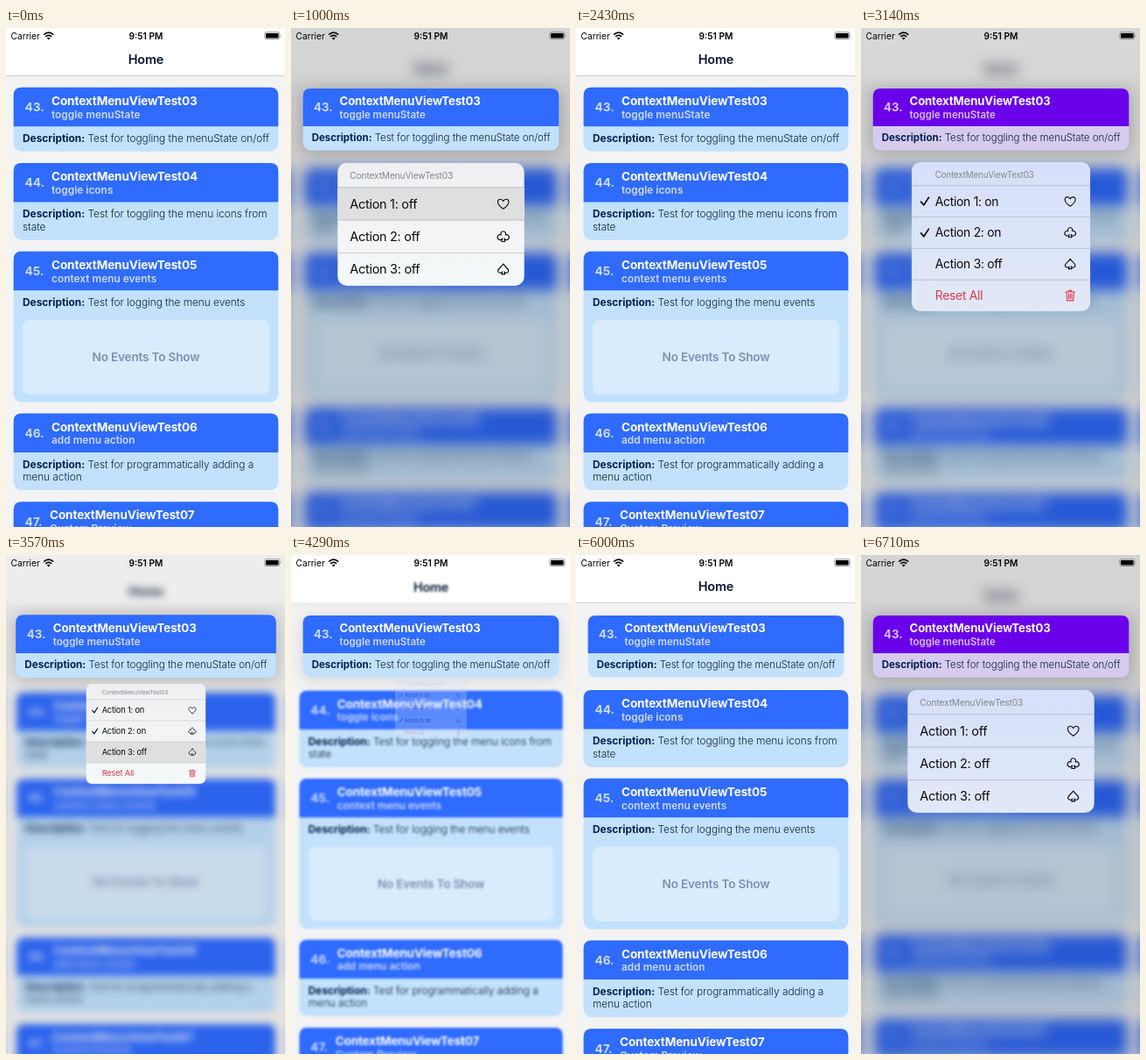
These frames come from a looping animation (319x569 px, 7 s). An HTML page:

```html
<!DOCTYPE html>
<html lang="en">
<head>
<meta charset="utf-8">
<style>
html, body { margin: 0; height: 100%; overflow: hidden; background: #f3f3f3; }
svg { display: block; width: 100%; height: 100%; font-family: Inter, "Liberation Sans", sans-serif; }
.title { font-size: 13.6px; font-weight: 700; letter-spacing: -.14px; fill: #fff; }
.num { font-size: 13.6px; font-weight: 700; fill: #ffffffbf; }
.sub { font-size: 11.9px; font-weight: 600; fill: #ffffffbf; }
.desc { font-size: 11.9px; font-weight: 300; letter-spacing: -.05px; fill: #10233f; }
.label { font-weight: 700; letter-spacing: 0; fill: #06204f; }
.empty { font-size: 13.6px; font-weight: 600; letter-spacing: -.2px; fill: #06204f70; text-anchor: middle; }
.nav { font-size: 14.5px; font-weight: 600; letter-spacing: -.2px; fill: #0b1733; text-anchor: middle; }
.status { font-size: 10.2px; }
.head { fill: var(--head, #2f6bff); }
.body { fill: var(--body, #c2e1fc); }
.caption { font-size: 10.2px; letter-spacing: -.15px; fill: #85868d; }
.action { font-size: 14.5px; letter-spacing: -.3px; }
.icon { fill: none; stroke-width: 1.2; stroke-linejoin: round; stroke-linecap: round; }
#bg { transform-origin: 159.5px 284.5px; }
#card { transform-origin: 160px 104.5px; }
#menu { transform-origin: 160px 135px; }
</style>
</head>
<body>
<svg viewBox="0 0 319 569">
  <defs>
    <linearGradient id="tint" x2="0" y2="1">
      <stop stop-color="#d7dffa"/><stop offset="1" stop-color="#e1e9f8"/>
    </linearGradient>
    <linearGradient id="plain" x2="0" y2="1">
      <stop stop-color="#efeff1"/><stop offset="1" stop-color="#f5f8f9"/>
    </linearGradient>
    <clipPath id="menuClip"><rect id="clipBox" x="53.3" y="153.7" width="213.4" rx="10.5"/></clipPath>
  </defs>
  <g id="bg">
    <rect x="-60" y="-60" width="439" height="689" fill="#f3f3f3"/>
    <path d="M-60-60H379V54H-60z" fill="#fff"/>
    <path d="M-60 54.5H379" stroke="#d2d2d4"/>
    <text class="nav" x="160" y="41">Home</text>
    <g id="list"></g>
    <!-- The blur mirrors the list at the screen edges. -->
    <use href="#list" transform="scale(-1 1)"/>
    <use href="#list" transform="translate(638) scale(-1 1)"/>
  </g>
  <rect id="dim" width="319" height="569"/>
  <g id="card"></g>
  <g id="menu"></g>
  <g class="status">
    <text x="5.5" y="12.6">Carrier</text>
    <g fill="none" stroke="#000" stroke-width="1.7">
      <path d="M43.2 7.6Q48.7 2.8 54.2 7.6M45.2 9.9Q48.7 7 52.2 9.9"/>
    </g>
    <path d="M46.8 11.4Q48.7 10 50.6 11.4L48.7 13.4z"/>
    <text x="160" y="12.6" text-anchor="middle" font-weight="600">9:51 PM</text>
    <rect x="295.8" y="4.8" width="17" height="7.8" rx="2" fill="none" stroke="#777" stroke-width=".8"/>
    <rect x="297" y="6" width="14.6" height="5.4" rx="1"/>
    <path d="M313.8 7.3Q315.2 8.7 313.8 10.1z" fill="#777"/>
  </g>
</svg>
<script>
const $ = id => document.getElementById(id);
const clamp = v => Math.max(0, Math.min(1, v));
const easeInOut = v => (v = clamp(v)) < .5 ? 4 * v ** 3 : 1 - (2 - 2 * v) ** 3 / 2;
const easeOut = v => 1 - (1 - clamp(v)) ** 3;
const text = (cls, x, y, s, extra = '') => `<text class="${cls}" x="${x}" y="${y}" ${extra}>${s}</text>`;

function card(num, y, height, sub, line1, line2 = '', titleX = 52) {
  return `<rect class="body" x="8.7" y="${y}" width="302.6" height="${height}" rx="9"/>
    <path class="head" d="M8.7 ${y + 44.5}v-35.5q0-9 9-9h284.6q9 0 9 9v35.5z"/>` +
    text('num', 21.5, y + 27.2, num + '.') +
    text('title', titleX, y + 20, 'ContextMenuViewTest0' + (num - 40)) +
    text('sub', titleX, y + 34.8, sub) +
    text('desc', 19, y + 62, `<tspan class="label">Description:</tspan> ${line1}`) +
    text('desc', 19, y + 76.6, line2);
}

$('list').innerHTML =
  card(44, 154, 88, 'toggle icons', 'Test for toggling the menu icons from', 'state') +
  card(45, 254.7, 172, 'context menu events', 'Test for logging the menu events') +
  '<rect x="19" y="332.7" width="282" height="85" rx="8" fill="#fff" fill-opacity=".36"/>' +
  text('empty', 160, 380, 'No Events To Show') +
  card(46, 439.5, 87.5, 'add menu action', 'Test for programmatically adding a', 'menu action') +
  card(47, 540.3, 88, 'Custom Preview', '', '', 50);
$('card').innerHTML = card(43, 67.7, 73, 'toggle menuState', 'Test for toggling the menuState on/off');

const ICONS = [
  'M0 6.2C-9 .5-7.5-5.5-3.7-5.5-1.8-5.5-.6-4.4 0-3 .6-4.4 1.8-5.5 3.7-5.5 7.5-5.5 9 .5 0 6.2Z',
  'M-1.2 2.4A3.1 3.1 0 1 1-2.6-2 3 3 0 1 1 2.6-2 3.1 3.1 0 1 1 1.2 2.4L2 6H-2Z',
  'M0-6.5C2-3 6.5-1 6.5 1.8A2.9 2.9 0 0 1 1.2 3L2 6H-2L-1.2 3A2.9 2.9 0 0 1-6.5 1.8C-6.5-1-2-3 0-6.5Z',
  'M-6-4.5H6M-2-4.5V-6.3H2V-4.5M-4.7-4.5L-4 6.5H4L4.7-4.5M-2-2V4M0-2V4M2-2V4'
];
const TOP = 153.7, HEADER = 28, ROW = 37.4;

// `on` counts the enabled actions, `pick` is the pressed row or -1.
function menu(on, pick, tapped) {
  const rows = on ? 4 : 3, height = HEADER + rows * ROW, x = on ? 81.5 : 67.3;
  $('clipBox').setAttribute('height', height);
  let out = `<g clip-path="url(#menuClip)">
    <rect x="53" y="${TOP}" width="214" height="${height}" fill="url(#${tapped ? 'plain' : 'tint'})"/>` +
    text('caption', x, 172.3, 'ContextMenuViewTest03');
  for (let i = 0; i < rows; i++) {
    const y = TOP + HEADER + i * ROW, mid = y + ROW / 2, reset = i === 3;
    const color = reset ? '#e23b48' : '#0c0c10';
    if (i === pick) out += `<rect x="53" y="${y}" width="214" height="${ROW}" fill="#dfdfdf"/>`;
    out += `<path d="M53 ${y}h214" stroke="#3c3c43" stroke-opacity=".28" stroke-width=".8"/>` +
      text('action', x, mid + 5.2, reset ? 'Reset All' : `Action ${i + 1}: ${i < on ? 'on' : 'off'}`, `fill="${color}"`) +
      `<path class="icon" stroke="${color}" transform="translate(242.7 ${mid}) scale(.94)" d="${ICONS[i]}"/>`;
    if (i < on) out += `<path class="icon" style="stroke-width:1.8" stroke="#0c0c10" d="M64.5 ${mid + .5}l3.3 4 6-9"/>`;
  }
  return out + '</g>';
}

// Each visit: finger down, menu opens, menu closes.
const VISITS = [
  { press: 20, open: 430, close: 1080, on: 0, pick: 0 },
  { press: 1400, open: 1640, close: 2080, on: 1, pick: 1 },
  { press: 2442, open: 2842, close: 3400, on: 2, pick: 2 },
  { press: 3762, open: 4162, close: 5070, on: 3, pick: 3 },
  { press: 5600, open: 6010, close: 9000, on: 0, pick: 0 }
];
const LOOP = 7000, STEP = LOOP / 49;

function render(t) {
  const v = VISITS.findLast(visit => visit.press <= t) || VISITS[0];
  const tapped = t >= v.close - 130;
  const stay = 1 - easeInOut((t - v.close) / 340);
  const shown = easeInOut((t - v.open) / 400) * stay;
  const pressed = easeOut((t - v.press) / 240) * stay;
  const purple = tapped ? 0 : 100 * clamp((t - v.open - 130) / 150);
  const mix = (a, b) => `color-mix(in srgb, ${a} ${purple}%, ${b})`;

  $('bg').style.transform = `scale(${1 - .045 * shown})`;
  $('bg').style.filter = shown ? `blur(${Math.min(1, shown * 1.1) * 8}px)` : 'none';
  $('dim').style.opacity = .17 * Math.max(0, shown * 1.15 - .15);

  const c = $('card').style;
  c.transform = `scale(${1 - .033 * pressed})`;
  c.filter = shown ? `drop-shadow(0 2px 9px rgba(0,0,0,${.22 * Math.min(1, shown * 5)}))` : 'none';
  c.setProperty('--head', mix('#6a00ea', '#2f6bff'));
  c.setProperty('--body', mix('#d6cbee', '#c2e1fc'));

  $('menu').innerHTML = shown ? menu(v.on, tapped ? v.pick : -1, tapped) : '';
  $('menu').style.transform = `scale(${.3 + .7 * shown})`;
  $('menu').style.opacity = Math.min(1, shown * 2.2);
}

const start = performance.now();
let last = -1;
function tick() {
  const time = (performance.now() - start) % LOOP;
  const step = Math.min(48, Math.floor((time + 4.5) / STEP));
  if (step !== last) render((last = step) * STEP);
  requestAnimationFrame(tick);
}
tick();
</script>
</body>
</html>
```
